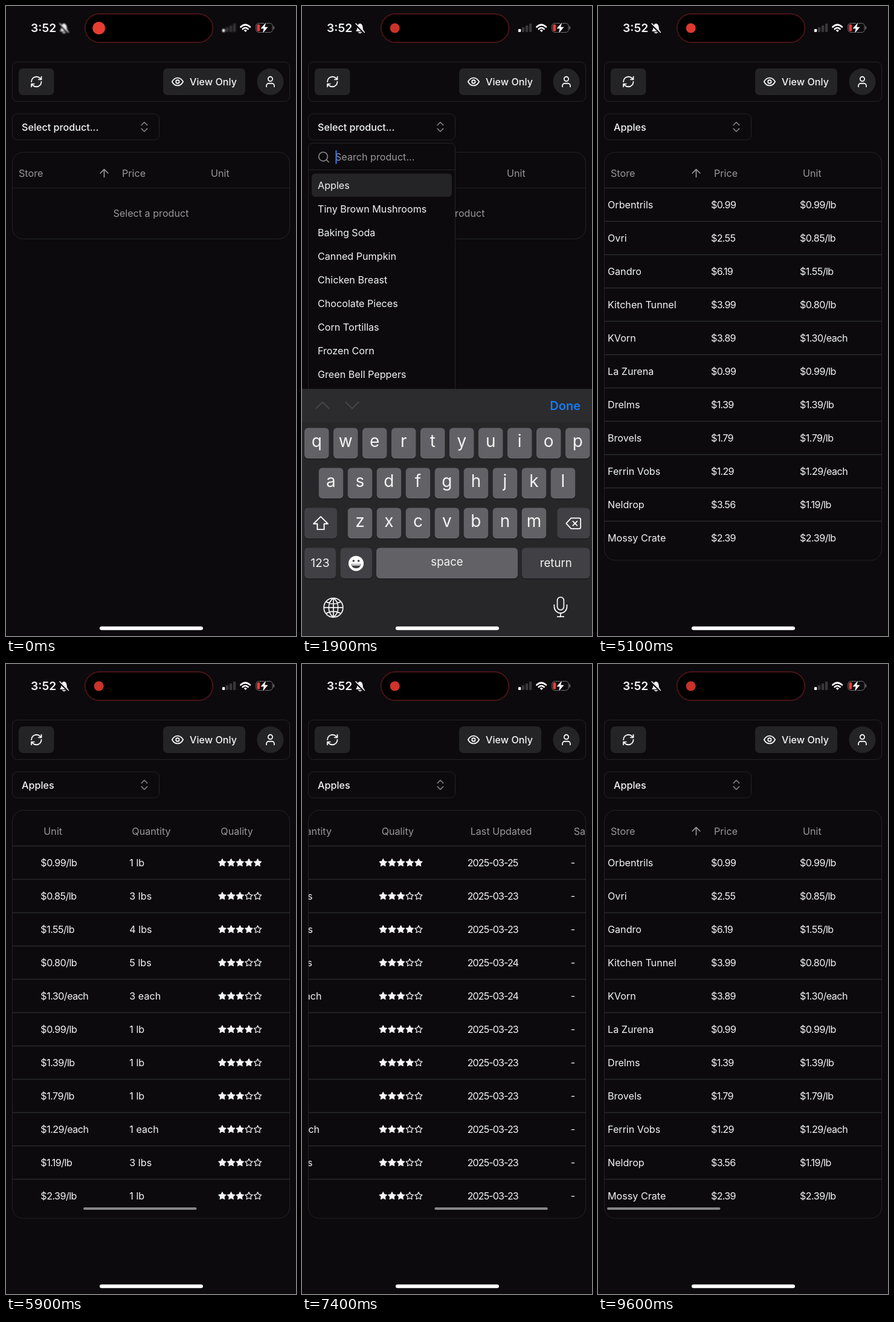
Recreate the animation shown at these times as an HTML page. Size 480x1040 px, loop 9700 ms.

```html
<!DOCTYPE html>
<html lang="en">
<head>
<meta charset="utf-8">
<title>Price table</title>
<style>
  html, body { margin: 0; width: 100%; height: 100%; overflow: hidden; background: #0c0a0d; }
  svg { display: block; width: 100%; height: 100%; }
  text { font-family: Inter, "Noto Sans", sans-serif; font-size: 16.15px; fill: #f4f4f5; white-space: pre; }
</style>
</head>
<body>
<svg id="stage" viewBox="0 0 480 1040"></svg>
<script>
const NS = 'http://www.w3.org/2000/svg';
const LOOP = 9700, STEP = 100;
const BG = '#0c0a0d', LINE = '#242327', PANEL = '#242326', INK = '#f4f4f5', MUTED = '#98979b';

const ICONS = {
  refresh: 'M3 12a9 9 0 0 1 9-9 9.75 9.75 0 0 1 6.74 2.74L21 8M21 3v5h-5M21 12a9 9 0 0 1-9 9 9.75 9.75 0 0 1-6.74-2.74L3 16M8 16H3v5',
  eye: 'M2 12Q6 5 12 5T22 12Q18 19 12 19T2 12zM9 12a3 3 0 1 0 6 0a3 3 0 1 0-6 0',
  user: 'M19 21v-2a4 4 0 0 0-4-4H9a4 4 0 0 0-4 4v2M8 7a4 4 0 1 0 8 0a4 4 0 1 0-8 0',
  sort: 'M7 15l5 5 5-5M7 9l5-5 5 5',
  up: 'M5 12l7-7 7 7M12 19V5',
  search: 'M3 11a8 8 0 1 0 16 0a8 8 0 1 0-16 0M21 21l-4.3-4.3',
  star: 'M12 2l3.09 6.26L22 9.27l-5 4.87 1.18 6.88L12 17.77l-6.18 3.25L7 14.14 2 9.27l6.91-1.01z',
  chevUp: 'M4 16l8-8 8 8',
  chevDown: 'M4 8l8 8 8-8',
  shift: 'M12 3L2.5 12.5H7.5V20H16.5V12.5H21.5z',
  erase: 'M8.5 4.5H20a2 2 0 0 1 2 2v11a2 2 0 0 1-2 2H8.5L1.5 12zM11 9l6 6M17 9l-6 6',
  globe: 'M2 12a10 10 0 1 0 20 0a10 10 0 1 0-20 0M12 2v20M2 12h20M12 2C5.5 7 5.5 17 12 22M12 2C18.5 7 18.5 17 12 22M4.5 6Q12 10 19.5 6M4.5 18Q12 14 19.5 18',
  mic: 'M12 1.5a3.6 3.6 0 0 0-3.6 3.6v6.8a3.6 3.6 0 0 0 7.2 0V5.1A3.6 3.6 0 0 0 12 1.5zM5 10v2a7 7 0 0 0 14 0v-2M12 19v4M8.5 23h7'
};

const ITEMS = ['Apples', 'Tiny Brown Mushrooms', 'Baking Soda', 'Canned Pumpkin', 'Chicken Breast',
  'Chocolate Pieces', 'Corn Tortillas', 'Frozen Corn', 'Green Bell Peppers'];

// store, price, unit price, quantity, stars, day of March
const ROWS = [
  ['Orbentrils', '0.99', '0.99/lb', '1 lb', 5, 25],
  ['Ovri', '2.55', '0.85/lb', '3 lbs', 3, 23],
  ['Gandro', '6.19', '1.55/lb', '4 lbs', 4, 23],
  ['Kitchen Tunnel', '3.99', '0.80/lb', '5 lbs', 3, 24],
  ['KVorn', '3.89', '1.30/each', '3 each', 3, 24],
  ['La Zurena', '0.99', '0.99/lb', '1 lb', 4, 23],
  ['Drelms', '1.39', '1.39/lb', '1 lb', 4, 23],
  ['Brovels', '1.79', '1.79/lb', '1 lb', 3, 23],
  ['Ferrin Vobs', '1.29', '1.29/each', '1 each', 3, 23],
  ['Neldrop', '3.56', '1.19/lb', '3 lbs', 3, 23],
  ['Mossy Crate', '2.39', '2.39/lb', '1 lb', 3, 23]
];
const HEADS = [['Store', 21], ['Price', 192], ['Unit', 339], ['Quantity', 485],
  ['Quality', 632], ['Last Updated', 779], ['Sale End Date', 950]];

// time, horizontal scroll of the table
const SCROLL = [[5400, 0], [5700, 150], [6000, 340], [6300, 495], [6700, 601], [7000, 641], [7200, 641],
  [7500, 430], [7800, 140], [8000, 49], [8300, 8], [8500, 0]];

function add(parent, tag, attrs = {}) {
  const node = document.createElementNS(NS, tag);
  for (const key in attrs) node.setAttribute(key, attrs[key]);
  return parent.appendChild(node);
}
const group = (parent, attrs) => add(parent, 'g', attrs);
const rect = (parent, x, y, width, height, rx, fill, stroke = 'none') =>
  add(parent, 'rect', { x, y, width, height, rx, fill, stroke });
const path = (parent, d, stroke, width, fill = 'none') =>
  add(parent, 'path', { d, fill, stroke, 'stroke-width': width, 'stroke-linecap': 'round', 'stroke-linejoin': 'round' });
const circle = (parent, cx, cy, r, fill) => add(parent, 'circle', { cx, cy, r, fill });

function text(parent, str, x, y, style = '', anchor = 'start') {
  const node = add(parent, 'text', { x, y, style, 'text-anchor': anchor });
  node.textContent = str;
  return node;
}
function icon(parent, name, cx, cy, size, color, width = 2, fill = 'none') {
  const k = size / 24;
  const g = group(parent, { transform: `translate(${cx - size / 2} ${cy - size / 2}) scale(${k})` });
  path(g, ICONS[name], color, width, fill);
}
const show = (node, on) => node.setAttribute('visibility', on ? 'visible' : 'hidden');
const clamp = v => Math.min(1, Math.max(0, v));

const stage = document.getElementById('stage');
const defs = add(stage, 'defs');
const clip = add(defs, 'clipPath', { id: 'tableClip' });
rect(clip, 11, 242, 458.5, 673, 18, '#fff');
rect(stage, 0, 0, 480, 1040, 0, BG);

// Toolbar and product selector
const medium = 'font-weight:500';
rect(stage, 10.5, 92.5, 459, 65, 8, 'none', LINE);
rect(stage, 21, 103, 58.5, 44, 7, PANEL);
icon(stage, 'refresh', 50.3, 125, 22, INK);
rect(stage, 260, 103, 136, 44, 7, PANEL);
icon(stage, 'eye', 284, 125, 22, INK);
text(stage, 'View Only', 304, 131, medium);
circle(stage, 437.5, 125, 22, PANEL);
icon(stage, 'user', 437.5, 125, 22, INK);
rect(stage, 10.5, 178, 243, 43, 8, 'none', LINE);
const choice = text(stage, '', 26, 205.5, medium);
icon(stage, 'sort', 229, 199.5, 23, '#7d7c80', 1.7);

// Table
const frame = rect(stage, 10.5, 241.5, 459, 143, 18, 'none', LINE);
const table = group(stage, { 'clip-path': 'url(#tableClip)' });
const empty = group(table);
path(empty, 'M11 300.5H469', '#1f1e21', 1);
text(empty, 'Select a product', 240, 348, `fill:${MUTED}`, 'middle');
const lines = group(table);
ROWS.forEach((_, i) => path(lines, `M11 ${300.5 + 55 * i}H469`, '#2a292d', 1.4));
const sheet = group(table);
HEADS.forEach(([label, x]) => text(sheet, label, x, 282, `fill:${MUTED}`));
icon(sheet, 'up', 162.5, 276, 22, MUTED, 1.8);
const body = group(sheet);
const tight = 'letter-spacing:-.7px';
ROWS.forEach(([store, price, unit, qty, stars, day], i) => {
  const y = 328 + 55 * i, base = y + 6;
  text(body, store, 16, base);
  text(body, '$' + price, 187, base, tight);
  text(body, '$' + unit, 334, base, 'letter-spacing:-.55px');
  text(body, qty, 481, base);
  for (let s = 0; s < 5; s++)
    icon(body, 'star', 634.6 + 14.66 * s, y, 14.66, INK, 2, s < stars ? INK : 'none');
  text(body, '2025-03-' + day, 774, base, 'letter-spacing:-.95px');
  text(body, '-', 945, base);
});
const thumb = rect(stage, 15, 897, 187.5, 4, 2, '#868588');

// Product list
const pop = group(stage);
rect(pop, 10.5, 226.5, 243, 411, 7, BG, LINE);
icon(pop, 'search', 36, 249.5, 22, '#89888c', 1.8);
text(pop, 'Search product...', 55, 255, `fill:${MUTED}`);
path(pop, 'M11 270.5H253', LINE, 1);
rect(pop, 16, 276.5, 232, 38.5, 6, PANEL);
ITEMS.forEach((name, i) => text(pop, name, 26, 302 + 39 * i));
const caret = rect(pop, 55.5, 238, 2, 23, 1, '#3a78f2');

// Keyboard
const board = group(stage);
rect(board, 0, 631, 480, 420, 0, '#272629');
rect(board, 0, 631, 480, 55, 0, '#2c2b2e');
icon(board, 'chevUp', 34, 658, 32, '#4a494d', 1.4);
icon(board, 'chevDown', 83, 658, 32, '#4a494d', 1.4);
text(board, 'Done', 461, 665.5, 'font-size:20px;font-weight:600;fill:#147df5', 'end');
function key(x, y, w, fill, label, size, drop) {
  rect(board, x, y + 1.3, w, 50.5, 6, '#19181b');
  rect(board, x, y, w, 50.5, 6, fill);
  if (label) text(board, label, x + w / 2, y + drop, `font-size:${size}px`, 'middle');
}
const KEY = '#626165', DARK_KEY = '#414044';
[['qwertyuiop', 4, 695.3], ['asdfghjkl', 27.7, 761.3], ['zxcvbnm', 75.7, 827.3]].forEach(([row, x, y]) =>
  [...row].forEach((ch, i) => key(x + 48 * i, y, 40.5, KEY, ch, 28, 32)));
key(4, 827.3, 54, DARK_KEY);
icon(board, 'shift', 31, 853, 30, '#fff', 1.5);
key(422.5, 827.3, 54, DARK_KEY);
icon(board, 'erase', 449.5, 853, 28, '#fff', 1.5);
key(4, 893.3, 52, DARK_KEY, '123', 19.3, 32);
key(63.5, 893.3, 52.5, DARK_KEY);
circle(board, 89.5, 919, 12.5, '#fff');
circle(board, 85.3, 914.8, 1.8, DARK_KEY);
circle(board, 93.7, 914.8, 1.8, DARK_KEY);
path(board, 'M81.5 920h16q-1 7-8 7t-8-7z', 'none', 0, DARK_KEY);
path(board, 'M83.2 921.5h12.6', '#fff', 1.6);
key(123, 893.3, 234, KEY, 'space', 18.6, 30);
key(364, 893.3, 112.5, DARK_KEY, 'return', 18.7, 32);
icon(board, 'globe', 52, 992, 38, INK, 1.1);
icon(board, 'mic', 428, 990.5, 36, INK, 1.2);

// Status bar
text(stage, '3:52', 41, 43, 'font-size:19.3px;font-weight:600');
const soft = group(stage);
path(soft, 'M90 41q2-2 2-6q0-5 4-5.6q4 .6 4 5.6q0 4 2 6z', INK, 1, INK);
path(soft, 'M94 43.4q2 2 4 0', INK, 1.6);
path(soft, 'M88.5 30.5L102.5 44', BG, 3.4);
path(soft, 'M89 29L103.5 43.5', INK, 1.5);
[5, 8, 11, 14].forEach((h, i) => rect(soft, 358 + 6 * i, 43 - h, 4.3, h, 1.2, i ? '#38373b' : '#fff'));
path(stage, 'M388.5 34.5q7.7-7 15.4 0', '#fff', 2.8);
path(stage, 'M391.7 38q4.5-4 9 0', '#fff', 2.6);
path(stage, 'M396.2 42.3l-2-2q2-1.6 4 0z', '#fff', 1, '#fff');
rect(stage, 413.8, 28.5, 27.4, 15, 4.5, 'none', '#727175');
path(stage, 'M443.3 34v4', '#727175', 1.6);
rect(stage, 415.5, 30.2, 4.8, 11.6, 2, '#f23b31');
path(stage, 'M429.5 28.5l-7.5 8.6h5l-1.6 7 7.6-9h-5z', BG, 3, BG);
path(stage, 'M429.5 28.5l-7.5 8.6h5l-1.6 7 7.6-9h-5z', '#fff', .6, '#fff');
add(stage, 'rect', { x: 130.8, y: 13, width: 211.5, height: 47, rx: 23.5, fill: '#000', stroke: '#481316', 'stroke-width': 2 });
const dot = circle(stage, 153.7, 36.5, 8, '#e63c30');
rect(stage, 155, 1024.3, 171, 6, 3, '#fff');

function scrollAt(t) {
  const n = SCROLL.findIndex(k => k[0] > t);
  if (n < 1) return 0;
  const [t0, a] = SCROLL[n - 1], [t1, b] = SCROLL[n];
  return a + (b - a) * (t - t0) / (t1 - t0);
}
// Critically damped spring, from 1 at the start to 0
function spring(ms) {
  const u = Math.max(0, ms) * 0.018;
  return (1 + u) * Math.exp(-u);
}

function draw(t) {
  const picked = t >= 3600;
  choice.textContent = picked ? 'Apples' : 'Select product...';
  frame.setAttribute('height', picked ? 673.5 : 143);
  show(empty, !picked);
  show(lines, picked);
  show(body, picked);

  const x = scrollAt(t);
  sheet.setAttribute('transform', `translate(${-x} 0)`);
  thumb.setAttribute('x', 15 + x * 0.4085);
  thumb.setAttribute('opacity', clamp((t - 5350) / 150));

  pop.setAttribute('opacity', clamp((t - 1350) / 150) * clamp((3700 - t) / 150));
  caret.setAttribute('opacity', clamp(0.5 + Math.cos((t - 1750) * Math.PI / 500)));
  const drop = 409 * (t < 3520 ? spring(t - 1450) : 1 - spring(t - 3520));
  board.setAttribute('transform', `translate(0 ${drop})`);
  show(board, drop < 408.5);

  const intro = clamp(1 - t / 400);
  const glow = Math.max(intro, 0.5 + 0.5 * Math.cos((t - 700) * Math.PI / 1000));
  dot.setAttribute('r', 8 + 2.5 * intro);
  dot.setAttribute('fill', `rgb(${198 + 34 * glow},${50 + 11 * glow},${41 + 8 * glow})`);
  soft.style.filter = intro ? `blur(${1.1 * intro}px)` : 'none';
}

function tick() {
  draw(Math.floor(performance.now() % LOOP / STEP) * STEP);
  requestAnimationFrame(tick);
}
tick();
</script>
</body>
</html>
```
